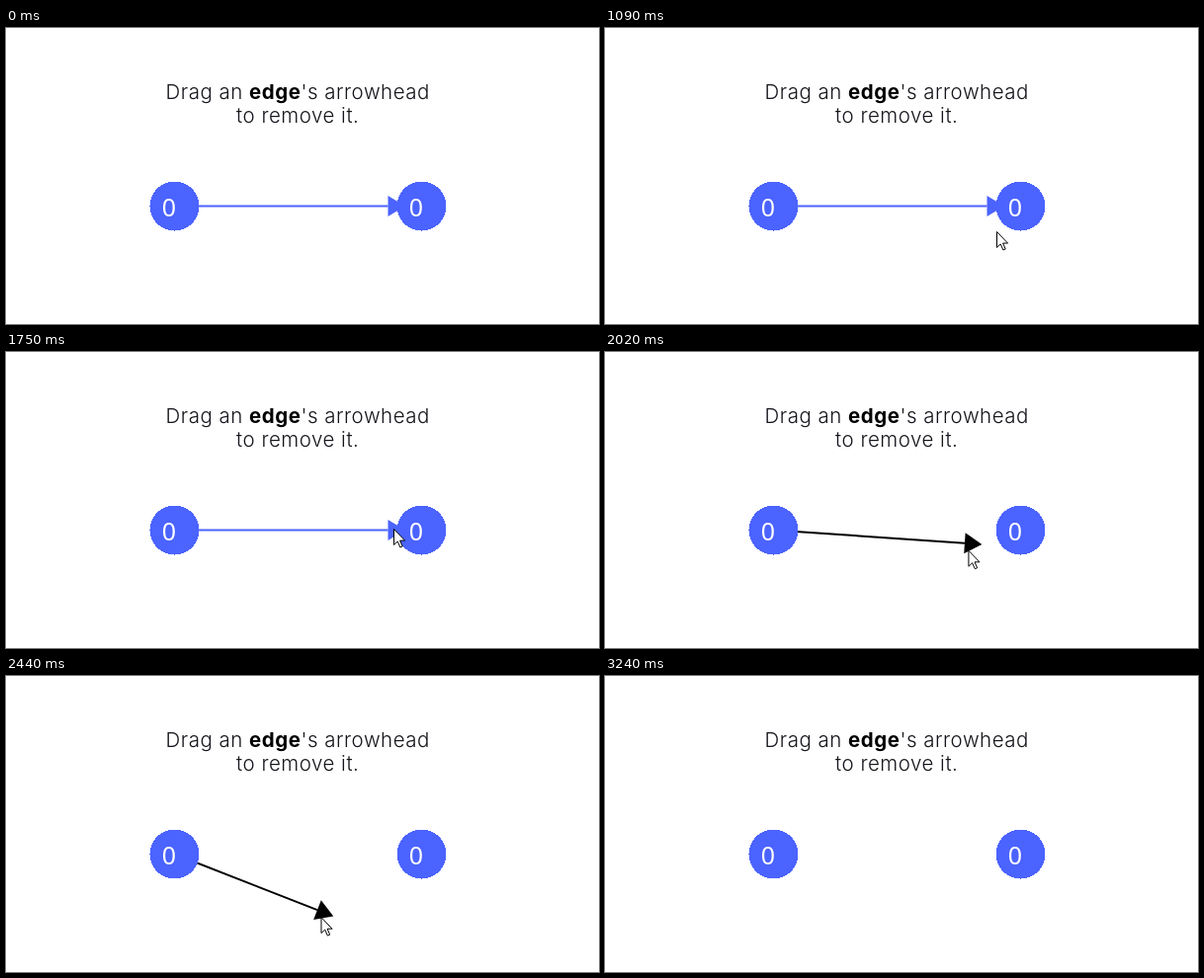
These frames come from a looping animation (600 px wide and 300 px high, 4670 ms). An HTML page:

```html
<!DOCTYPE html>
<html lang="en">
<head>
<meta charset="utf-8">
<title>Remove an edge</title>
<style>
  html, body { margin: 0; width: 100%; height: 100%; overflow: hidden; background: #fff; }
  svg { display: block; width: 600px; height: 300px; }
  .hint { font: 300 20.5px Inter, sans-serif; letter-spacing: .5px; fill: #15151c; text-anchor: middle; }
  .hint tspan { font-weight: 700; fill: #000; }
  .node circle { fill: #4b63ff; shape-rendering: crispEdges; }
  .node text { font: 500 25px "Noto Sans", sans-serif; fill: #fff; text-anchor: middle; }
</style>
</head>
<body>
<svg viewBox="0 0 600 300">
  <g class="hint">
    <text x="295.2" y="72">Drag an <tspan>edge</tspan>'s arrowhead</text>
    <text x="295.2" y="96">to remove it.</text>
  </g>
  <g id="edge">
    <path id="shaft" stroke="currentColor" stroke-width="2"/>
    <path id="head" d="M0-10.5L17.5 0L0 10.5Z" fill="currentColor"/>
  </g>
  <g class="node" transform="translate(170.5 180.5)">
    <circle r="25"/><text x="-5.5" y="10.5">0</text>
  </g>
  <g class="node" transform="translate(420.5 180.5)">
    <circle r="25"/><text x="-5.5" y="10.5">0</text>
  </g>
  <path id="cursor" d="M.5.5V16.5L4.2 13L6.9 19L9.2 18L6.6 12.1H11.6Z" fill="#fff" stroke="#000"/>
</svg>
<script>
  const LOOP = 4670, ENTER = 570, GRAB = 1870, RELEASE = 2900, EXIT = 3240;
  const [edge, shaft, head, cursor] =
    ["edge", "shaft", "head", "cursor"].map(id => document.getElementById(id));

  const origin = { x: 170.5, y: 180.5 };
  const anchor = { x: 386.5, y: 180.5 };
  const below = { x: 396, y: 206 };
  const grip = { x: 392, y: 179 };
  const drop = { x: 313, y: 249 };

  const linear = u => u;
  const easeOut = u => Math.sin(u * Math.PI / 2);
  const easeIn = u => 1 - Math.cos(u * Math.PI / 2);

  // The cursor rests at the end of each leg until the next one starts.
  const legs = [
    { start: ENTER, end: 1090, ease: linear, points: [{ x: 397, y: 293 }, { x: 416, y: 250 }, below] },
    { start: 1120, end: 1570, ease: linear, points: [below, { x: 415, y: 110 }, { x: 458, y: 112 }, grip] },
    { start: GRAB, end: 2620, ease: easeOut, points: [grip, drop] },
    { start: RELEASE, end: EXIT, ease: easeIn, points: [drop, { x: 310, y: 302 }] }
  ];

  const mix = (a, b, u) => ({ x: a.x + (b.x - a.x) * u, y: a.y + (b.y - a.y) * u });

  function bezier(points, u) {
    if (points.length === 1) return points[0];
    return bezier(points.slice(1).map((point, i) => mix(points[i], point, u)), u);
  }

  function cursorAt(time) {
    const leg = legs.findLast(({ start }) => time >= start) || legs[0];
    const u = (time - leg.start) / (leg.end - leg.start);
    return bezier(leg.points, leg.ease(Math.min(1, Math.max(0, u))));
  }

  function show(element, visible) {
    element.setAttribute("visibility", visible ? "visible" : "hidden");
  }

  function draw(time) {
    const pointer = cursorAt(time);
    cursor.setAttribute("transform", `translate(${pointer.x} ${pointer.y})`);
    show(cursor, time >= ENTER && time < EXIT);

    const dragged = time >= GRAB;
    const { x, y } = dragged ? { x: pointer.x - 3.5, y: pointer.y - 7 } : anchor;
    const angle = Math.atan2(y - origin.y, x - origin.x) * 180 / Math.PI;
    shaft.setAttribute("d", `M${origin.x} ${origin.y}L${x} ${y}`);
    head.setAttribute("transform", `translate(${x} ${y}) rotate(${angle})`);
    edge.setAttribute("color", dragged ? "#000" : "#4b63ff");
    show(edge, time < RELEASE);
  }

  const start = performance.now();
  function tick() {
    draw((performance.now() - start) % LOOP);
    requestAnimationFrame(tick);
  }
  tick();
</script>
</body>
</html>
```
